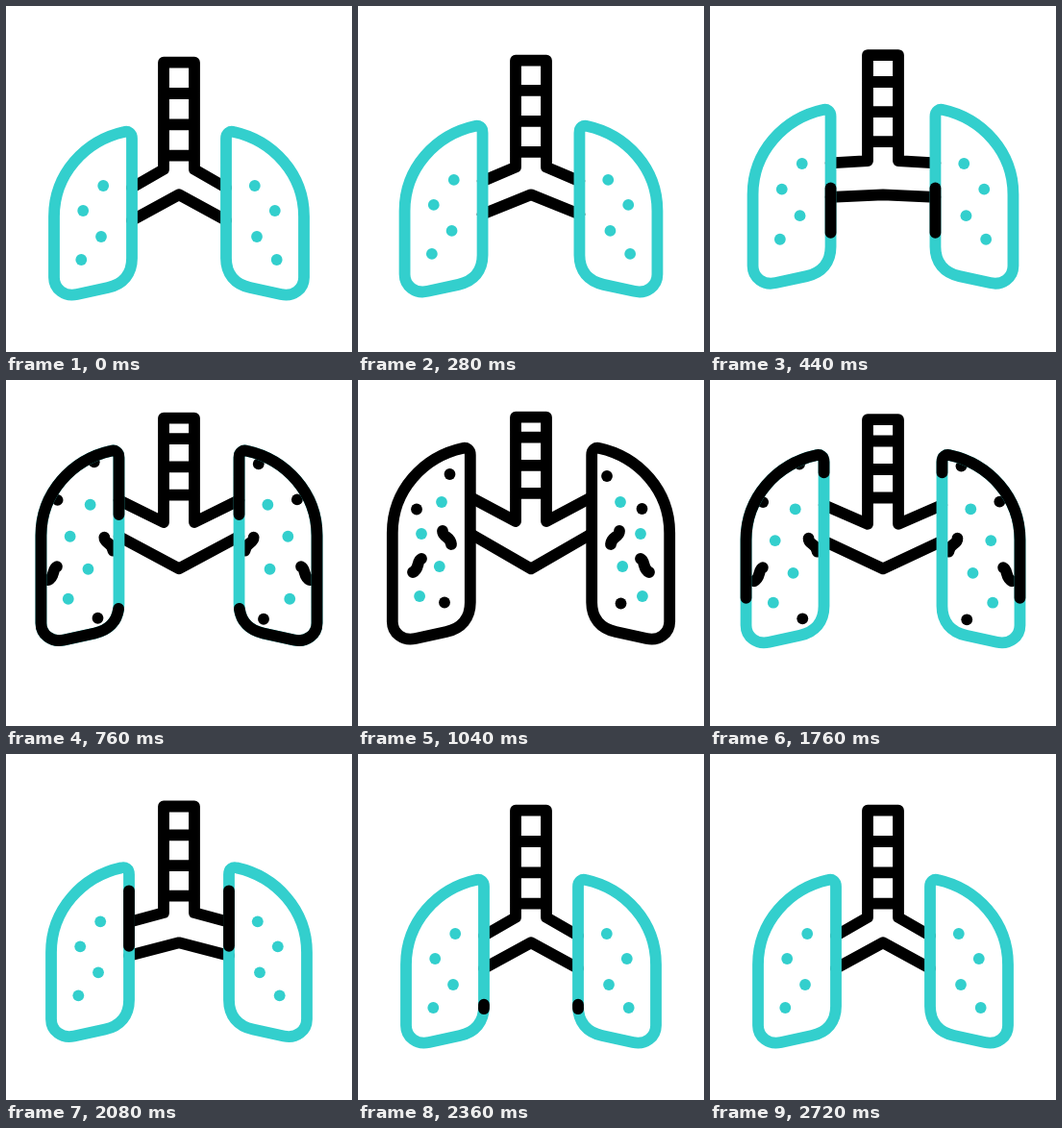
An HTML page that plays this animation: 360x360 px, repeating every 2800 ms.

```html
<!DOCTYPE html>
<html>
<head>
<meta charset="utf-8">
<style>
  html, body { margin: 0; height: 100%; overflow: hidden; background: #fff; }
  svg { display: block; width: 100vw; height: 100vh; fill: none; stroke-width: 11.8; stroke-linecap: round; stroke-linejoin: round; }
</style>
</head>
<body>
<svg id="stage" viewBox="0 0 360 360"></svg>
<script>
const stage = document.getElementById('stage');
const LOOP = 2800, TEAL = '#33cfcd', BLACK = '#000';

const clamp = x => Math.min(1, Math.max(0, x));

// Smooth 0 to 1 between two times
function ease(t, from, to) {
  const x = clamp((t - from) / (to - from));
  return x * x * x * (x * (6 * x - 15) + 10);
}

const breath = t => ease(t, 72, 916) - ease(t, 1548, 2348);
const invasion = t => ease(t, 560, 924) - ease(t, 1603, 1967);

// The black outline is drawn on with an ease and retracts exponentially, while its start drifts steadily
const trimLength = t => ease(t, 254, 1007) * clamp(1.1 * Math.exp((1480 - t) / 383) - .1);
const trimStart = t => -.00045 * Math.max(1030 - t, t - 1710, 0);

const dot = (x, y, color) => `<circle cx="${x}" cy="${y}" r="5.9" fill="${color}"/>`;
const line = (d, color, extra = '') => `<path d="${d}" stroke="${color}" ${extra}/>`;
const shift = (x, y, body) => `<g transform="translate(${x} ${y})">${body}</g>`;

function airway(p) {
  const top = 58.7 - 20 * p, fork = 170 - 23 * p, x = 131 - 14 * p;
  const upper = 189 - 67 * p, lower = 223 - 63 * p;
  let rungs = '';
  for (let i = 0; i < 3; i++) rungs += `M164 ${91 + 32.3 * i - (31.3 + 3.2 * i) * p}H196`;
  return line(`M${x} ${upper}L164 ${fork}V${top}H196V${fork}L${360 - x} ${upper}` +
    `M${x} ${lower}L180 196.3L${360 - x} ${lower}${rungs}`, BLACK);
}

function lungOutline(p) {
  const a = 131 - 60 * p, b = 300.5 - 31 * p;
  return `M131 ${a + 7}C131 ${a + 1} 127 ${a - 1} 123 ${a}C82 ${a + 9} 50 ${a + 44} 50 ${a + 88}` +
    `V${b - 18}C50 ${b - 6} 61 ${b + 2.5} 74 ${b - .5}L106 ${b - 7.5}C122 ${b - 11} 131 ${b - 22} 131 ${b - 38}Z`;
}

function germs(out, [a, b, c]) {
  return shift(-5.5 * out, -17 * out, dot(...a, BLACK)) +
    shift(-10 * out, -13 * out, dot(...b, BLACK)) +
    shift(6 * out, 19 * out, dot(...c, BLACK)) +
    shift(-17 * out, 9 * out, line('M66 186C61 188 64 197 57 200', BLACK)) +
    shift(17 * out, 7 * out, line('M88 157C88 164 96 162 97 171', BLACK));
}

function lung(t, p, spots) {
  const d = lungOutline(p), len = trimLength(t), inside = invasion(t);
  const spread = 7 * ease(p, .2, 1);
  const cells = [[101.2, 187], [80.2, 213], [99, 240], [78.3, 264]]
    .map(([x, y], i) => dot(x, y - 60 * p + i * spread, TEAL)).join('');
  const invaders = inside > 0
    ? `<g clip-path="url(#inside)">${shift(14.2, 20 * (1 - p), germs(2 - 2 * inside, spots))}</g>` : '';
  const dash = len < 1
    ? `pathLength="1" stroke-dasharray="${len} ${1 - len}" stroke-dashoffset="${-trimStart(t)}"` : '';
  return shift(-14.2 * p, 0, cells + invaders +
    (len < 1 ? line(d, TEAL) : '') + (len > .002 ? line(d, BLACK, dash) : ''));
}

function draw(t) {
  const p = breath(t);
  stage.innerHTML = `<clipPath id="inside"><path d="${lungOutline(p)}"/></clipPath>` + airway(p) +
    lung(t, p, [[95.5, 98], [61, 134.5], [90, 231.5]]) +
    `<g transform="matrix(-1 0 0 1 360 0)">${lung(t, p, [[101, 100], [64.5, 134], [86.5, 232.5]])}</g>`;
}

function tick() {
  draw(performance.now() % LOOP);
  requestAnimationFrame(tick);
}
tick();
</script>
</body>
</html>
```
